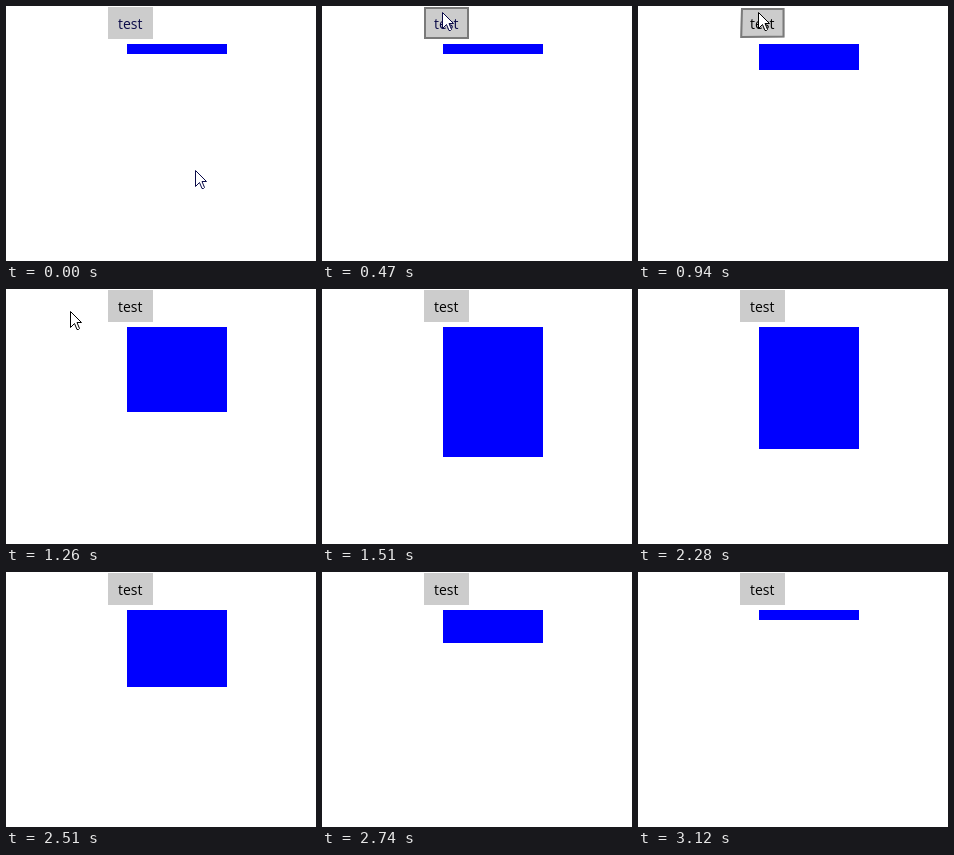
These frames come from a looping animation (310 px wide and 255 px high, 3.88 s). An HTML page:

```html
<!DOCTYPE html>
<html lang="en">
<head>
<meta charset="utf-8">
<title>Button and growing bar</title>
<style>
  html, body { margin: 0; width: 310px; height: 255px; overflow: hidden; background: #fff; }
  svg { display: block; }
  text { font: 14px "Open Sans", "Noto Sans", sans-serif; }
</style>
</head>
<body>
<svg width="310" height="255" viewBox="0 0 310 255">
  <polygon id="face"/>
  <text id="label" x="112" y="23">test</text>
  <polygon id="edge" fill="none" stroke="#7a7a7a" stroke-width="2"/>
  <rect id="bar" x="121" y="38" width="100" height="10" fill="#00f"/>
  <path id="cursor" d="M.5 .5V16.5L4.5 12.5L7 18.5H8.5L9.5 17.5L7 11.5H11.5Z" fill="#fff"/>
</svg>
<script>
const LOOP = 3880;
const PRESS = 700, RELEASE = 900, LEAVE = 1012, RETURN = 2886, GONE = 3120;
const APPROACH_STEP = 200 / 3, STEP = 2420 / 31;

const $ = id => document.getElementById(id);
const [face, label, edge, bar, cursor] = ["face", "label", "edge", "bar", "cursor"].map($);

const clamp01 = v => Math.min(1, Math.max(0, v));
const mix = (a, b, p) => a + (b - a) * p;

// The screen updates in steps; the last one holds until the loop restarts.
function snap(t) {
  const [from, step] = t < PRESS ? [3, APPROACH_STEP] : [PRESS, STEP];
  return Math.min(GONE, from + Math.floor((t - from + 1) / step) * step);
}

// Rises for one second, then falls for one second.
const barHeight = t => 10 + 190 * clamp01(1 - Math.abs(t - 1850) / 1000);

const tiltAt = t => 1.4 * Math.sin(Math.PI * clamp01((t - PRESS) / (LEAVE - PRESS)));

function pointer(t) {
  if (t < LEAVE) {
    const p = clamp01(t / 460);
    const eased = p * p * (3 - 2 * p);
    return [mix(189, 120, eased), mix(164, 6, eased)];
  }
  if (t < RETURN - 1) {
    const pull = ((t - LEAVE) / (2 * STEP)) ** 2;
    return [120 - 25 * pull, 6 + 7 * pull];
  }
  const p = (t - RETURN) / (GONE - RETURN);
  return [mix(13, 30, p), mix(228, 260, p)];
}

function corners(inset, tilt) {
  const l = 102 + inset, r = 147 - inset, top = 1 + inset, bottom = 33 - inset;
  return [[l + tilt, top + tilt], [r - tilt / 2, top + tilt],
    [r - tilt / 2, bottom - tilt * 1.5], [l + tilt / 4, bottom - tilt]].join(" ");
}

function render(now) {
  const t = snap(now % LOOP);
  const [x, y] = pointer(t);
  const tilt = tiltAt(t);
  const pressed = t >= PRESS && t < RELEASE;
  const hover = x >= 102 && x < 147 && y < 33;
  const ink = t < PRESS ? "#0a0a48" : "#000";

  face.setAttribute("points", corners(0, tilt));
  face.setAttribute("fill", pressed ? "#999" : "#ccc");
  edge.setAttribute("points", corners(1, tilt));
  edge.setAttribute("visibility", hover && !pressed ? "visible" : "hidden");
  label.setAttribute("fill", ink);
  bar.setAttribute("height", Math.round(barHeight(t)));
  cursor.setAttribute("stroke", ink);
  cursor.setAttribute("transform", `translate(${Math.round(x)} ${Math.round(y)})`);
}

const start = performance.now();
function loop() {
  render(performance.now() - start);
  requestAnimationFrame(loop);
}
loop();
</script>
</body>
</html>
```
